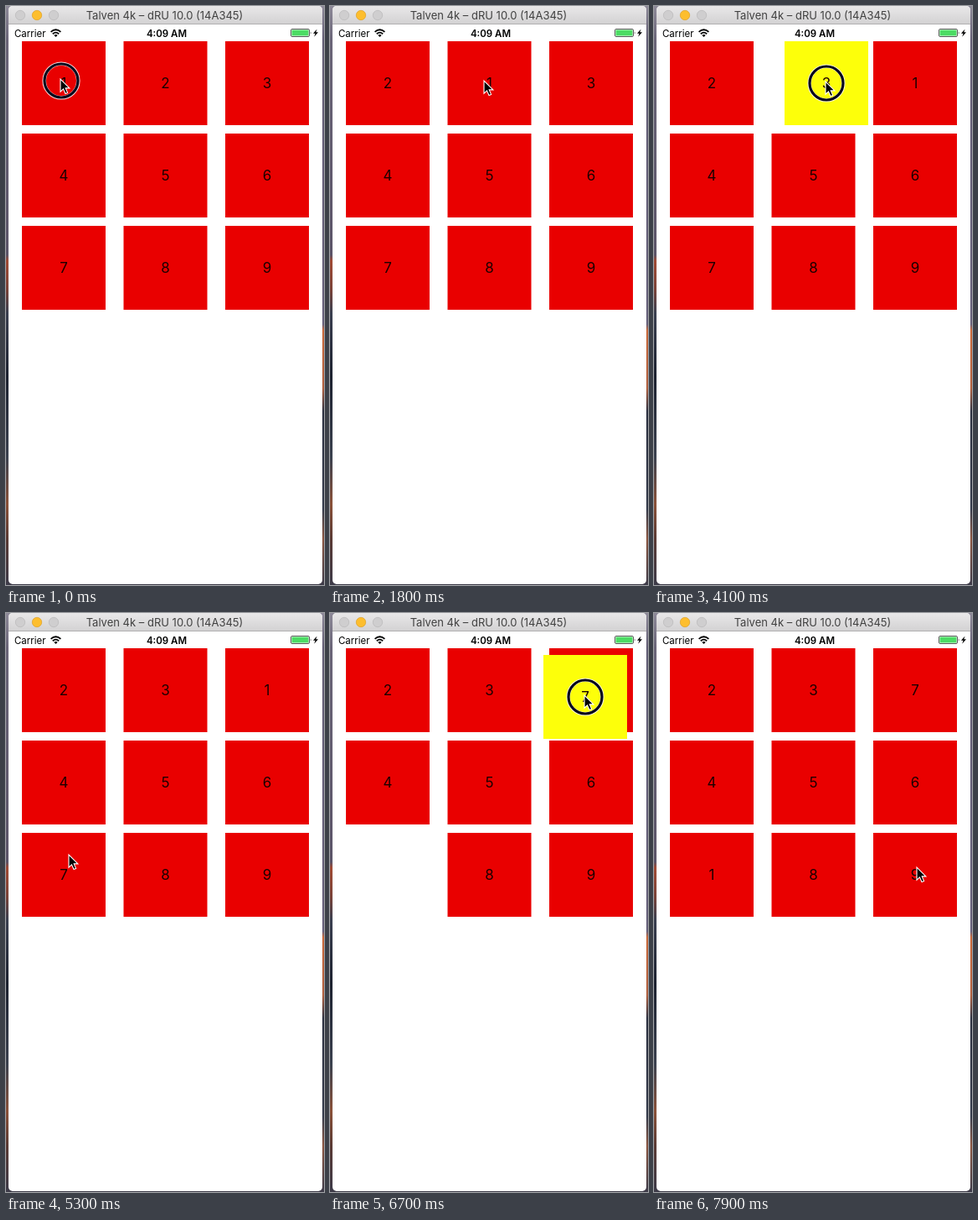
Recreate the animation shown at these times as an HTML page. Size 380 by 690 pixels, loop 8000 ms.

```html
<!DOCTYPE html>
<html lang="en">
<head>
<meta charset="utf-8">
<title>Swapping tiles</title>
<style>
  html, body { margin: 0; width: 100%; height: 100%; overflow: hidden; background: #4a4659; }
  svg { display: block; font-family: Inter, Roboto, sans-serif; }
  text { text-anchor: middle; }
</style>
</head>
<body>
<svg width="380" height="690" viewBox="0 0 380 690">
  <defs>
    <linearGradient id="bar" x2="0" y2="1">
      <stop stop-color="#e9e8e9"/><stop offset="1" stop-color="#d2d1d2"/>
    </linearGradient>
    <linearGradient id="left" x2="0" y2="1">
      <stop stop-color="#8d8998"/><stop offset=".06" stop-color="#6a6578"/>
      <stop offset=".43" stop-color="#5b5468"/><stop offset=".44" stop-color="#a04a34"/>
      <stop offset=".49" stop-color="#7a4238"/><stop offset=".53" stop-color="#3a3f50"/>
      <stop offset=".64" stop-color="#1d2230"/><stop offset=".78" stop-color="#3b414f"/>
      <stop offset=".86" stop-color="#8a5138"/><stop offset=".92" stop-color="#5a3a34"/>
      <stop offset="1" stop-color="#3c3a48"/>
    </linearGradient>
    <linearGradient id="right" x2="0" y2="1">
      <stop stop-color="#8d8998"/><stop offset=".06" stop-color="#625d74"/>
      <stop offset=".55" stop-color="#66607a"/><stop offset=".56" stop-color="#c9683a"/>
      <stop offset=".66" stop-color="#b0603f"/><stop offset=".7" stop-color="#2c3040"/>
      <stop offset=".87" stop-color="#343a4a"/><stop offset=".92" stop-color="#8a5540"/>
      <stop offset="1" stop-color="#3c3a48"/>
    </linearGradient>
    <clipPath id="grid"><rect x="19" y="42" width="343" height="640"/></clipPath>
  </defs>

  <rect width="190" height="690" fill="url(#left)"/>
  <rect x="190" width="190" height="690" fill="url(#right)"/>
  <rect x="3" width="375" height="689" rx="5" fill="#fff"/>
  <path d="M3 22V5q0-5 5-5H373q5 0 5 5V22z" fill="url(#bar)"/>
  <path d="M3 21.5H378" stroke="#b1b0b1"/>
  <g stroke-width=".7">
    <circle cx="17" cy="11" r="5.7" fill="#cfcecf" stroke="#b9b8b9"/>
    <circle cx="37" cy="11" r="5.7" fill="#fdbe2e" stroke="#dfa023"/>
    <circle cx="57" cy="11" r="5.7" fill="#cfcecf" stroke="#b9b8b9"/>
  </g>
  <text x="189.5" y="16" font-size="13" fill="#414141">Talven 4k – dRU 10.0 (14A345)</text>

  <text x="28.7" y="36.5" font-size="11.5">Carrier</text>
  <text x="192" y="36.5" font-size="11.5" font-weight="600">4:09 AM</text>
  <g fill="none" stroke="#000" stroke-width="1.8">
    <path d="M53.6 30.9q5.9-5.4 11.8 0M55.8 33.2q3.7-3.2 7.4 0"/>
    <path d="M59.5 37l-2.2-2.3q2.2-1.6 4.4 0z" fill="#000" stroke="none"/>
  </g>
  <rect x="340.5" y="27.5" width="22" height="9" rx="1.5" fill="#fff" stroke="#333" stroke-width=".8"/>
  <rect x="341.5" y="28.5" width="20" height="7" rx=".5" fill="#4cdc64"/>
  <path d="M363.8 30.2q1.6 1.8 0 3.6z" fill="#333"/>
  <path d="M371.6 27.5l-4.6 5.2h2.6l-1.4 4 4.8-5.4h-2.7z"/>

  <g id="tiles" clip-path="url(#grid)"></g>
  <g id="pointer">
    <g id="ring" fill="none">
      <circle cx="1" cy="2" r="20.3" stroke="#fff" stroke-opacity=".85" stroke-width="4.6"/>
      <circle cx="1" cy="2" r="20" stroke="#08081c" stroke-width="3.2"/>
    </g>
    <path d="M0 0V15.2l3.5-3.3 2.5 5.6 2.6-1.1-2.4-5.5h4.7z" stroke="#fff" stroke-width="1.1"/>
  </g>
</svg>
<script>
const LOOP = 8000, STEP = 100, SLIDE = 300;
const RED = '#e90000', YELLOW = '#fdff0a';

// Pointer tip: time, x, y
const path = [
  [0, 65, 87], [400, 65, 87], [1100, 184, 89], [1800, 184, 89],
  [2300, 321, 83], [3100, 321, 83], [4000, 205, 90], [4500, 205, 90],
  [5300, 75, 288], [5500, 73, 296], [5900, 73, 296], [6700, 304, 98],
  [6900, 306, 94], [7600, 306, 94], [7900, 314, 303]
];
// Each drag moves one tile between slots and trades places with another
const drags = [
  { tile: 1, other: 2, from: 0, to: 1, press: 0, pick: 300, swap: 900, drop: 1400 },
  { tile: 3, other: 1, from: 2, to: 1, press: 2300, pick: 2800, swap: 3700, drop: 4300 },
  { tile: 7, other: 1, from: 6, to: 2, press: 5500, pick: 5900, swap: 6800, drop: 7300 }
];

const byId = id => document.getElementById(id);
const tilesNode = byId('tiles'), pointer = byId('pointer'), ring = byId('ring');
const ease = (t, start, length) => {
  const p = Math.min(1, Math.max(0, (t - start) / length));
  return p * p * (3 - 2 * p);
};
const mix = (a, b, p) => a.map((v, i) => v + (b[i] - v) * p);
const slot = i => [69 + 121.5 * (i % 3), 92 + 110 * Math.floor(i / 3)];
const place = (node, [x, y]) => node.setAttribute('transform', `translate(${x} ${y})`);

for (let n = 1; n <= 9; n++) {
  tilesNode.insertAdjacentHTML('beforeend',
    `<g><rect x="-50" y="-50" width="100" height="100"/>
     <text y="6" font-size="17" fill="#1c0000">${n}</text></g>`);
}
const tiles = [...tilesNode.children];

function tipAt(t) {
  let i = 0;
  while (i < path.length - 2 && t >= path[i + 1][0]) i++;
  const [start, ...a] = path[i], [end, ...b] = path[i + 1];
  return mix(a, b, ease(t, start, end - start));
}

function draw(t) {
  const tip = tipAt(t), held = [tip[0] + 1, tip[1] + 2];
  const spots = tiles.map((_, i) => slot(i));
  let lifted = 0, pressed = false;

  for (const d of drags) {
    if (t >= d.press && t < d.drop) pressed = true;
    if (t >= d.swap) {
      spots[d.other - 1] = mix(slot(d.to), slot(d.from), ease(t, d.swap, SLIDE));
    }
    if (t >= d.pick) {
      spots[d.tile - 1] = mix(held, slot(d.to), ease(t, d.drop, 200));
      if (t < d.drop) lifted = d.tile;
    }
  }
  tiles.forEach((tile, i) => {
    place(tile, spots[i]);
    tile.firstChild.setAttribute('fill', i + 1 === lifted ? YELLOW : RED);
  });
  const top = lifted ? tiles[lifted - 1] : null;
  const order = tiles.filter(tile => tile !== top);
  tilesNode.append(...order, ...(top ? [top] : []));
  place(pointer, tip);
  ring.setAttribute('visibility', pressed ? 'visible' : 'hidden');
}

let shown = -1;
function frame(now) {
  const t = Math.floor(now % LOOP / STEP) * STEP;
  if (t !== shown) draw(shown = t);
  requestAnimationFrame(frame);
}
draw(0);
requestAnimationFrame(frame);
</script>
</body>
</html>
```
